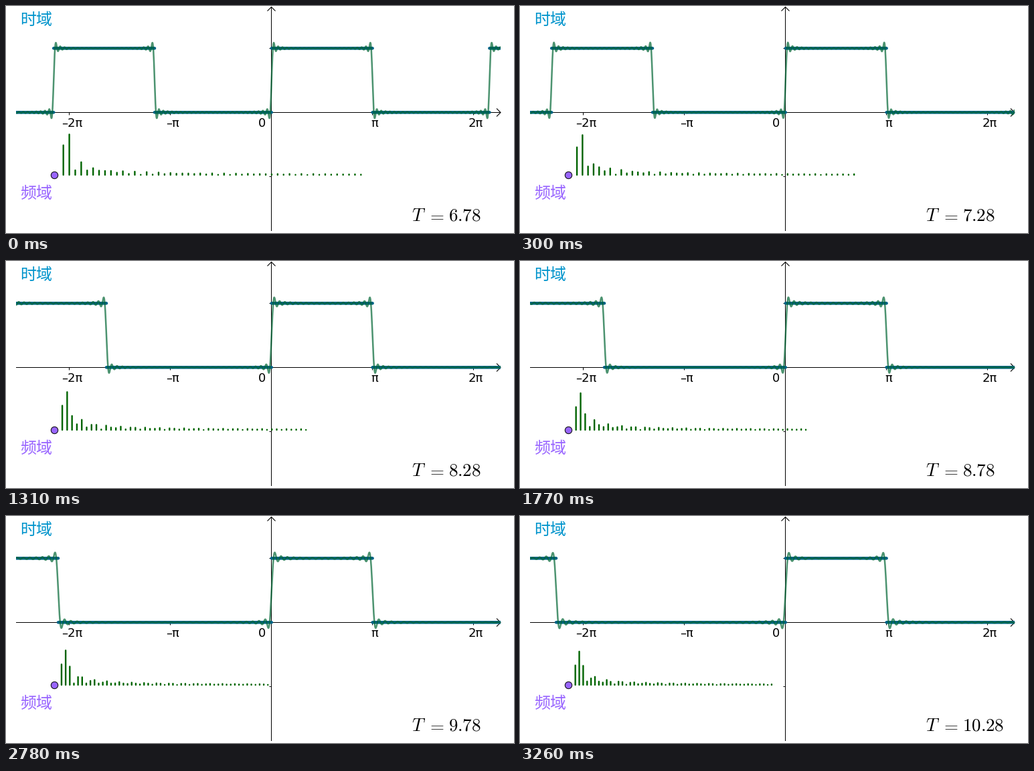
Write a matplotlib script that moves like this. It is 759x340 px and loops after 3720 ms.

```python
import numpy as np
import matplotlib.pyplot as plt
from matplotlib.animation import FuncAnimation

W, H, DPI = 759, 340, 64
PX = 72 / DPI                  # points per pixel
AX_X, AX_Y = 396.5, 159.5      # where the axes cross
OX, OY, UNIT = 396.8, 159.3, 48
LEFT, RIGHT = 15, 739
HARMONICS = 50
LEVEL = 2                      # height of the pulse
BAR_X, BAR_Y = 76.8, 253

STEP = 10
LOOP = 3720
CHANGES = [300, 780, 1310, 1770, 2320, 2780, 3260]

plt.rcParams["mathtext.fontset"] = "cm"
plt.rcParams["toolbar"] = "None"
plt.rcParams["path.snap"] = False
fig = plt.figure(figsize=(W / DPI, H / DPI), dpi=DPI, facecolor="white")
ax = fig.add_axes([0, 0, 1, 1])
ax.set_xlim(0, W)
ax.set_ylim(H, 0)
ax.axis("off")


def line(xs, ys, color, width, cap="butt", **kw):
    return ax.plot(xs, ys, color=color, lw=width * PX, solid_capstyle=cap, **kw)[0]


def label(x, y, text, size, color="black", font="DejaVu Sans", ha="left"):
    return ax.text(x, y, text, fontsize=size * PX, color=color,
                   family=font, ha=ha, va="baseline")


def draw_axes():
    line([LEFT, RIGHT], [AX_Y, AX_Y], "black", 1)
    line([AX_X, AX_X], [1, 337], "black", 1)
    line([733, 739, 733], [153.5, AX_Y, 165.5], "black", 1.1)
    line([390.5, AX_X, 402.5], [7.5, 1.5, 7.5], "black", 1.1)
    for k in (-2, -1, 1, 2):
        x = np.floor(AX_X + k * np.pi * UNIT) + 0.5
        line([x, x], [AX_Y, AX_Y + 4], "black", 1)
    for y in (AX_Y - 2 * UNIT, AX_Y + 2 * UNIT):
        line([AX_X - 3, AX_X], [y, y], "black", 1)
    for x, text in ((98.5, "–2π"), (248.5, "–π"), (382.5, "0"),
                    (550.5, "π"), (702, "2π")):
        label(x, 181, text, 18, ha="center")


def pulse_path(period):
    """High and low segments in pixels, separated by gaps."""
    xs, ys = [], []
    for k in range(-3, 4):
        for a, b, level in ((0, np.pi, LEVEL), (np.pi, period, 0)):
            x0 = max(OX + UNIT * (k * period + a), LEFT)
            x1 = min(OX + UNIT * (k * period + b), RIGHT)
            if x0 < x1:
                xs += [x0, x1, np.nan]
                ys += [OY - UNIT * level] * 2 + [np.nan]
    return xs, ys


def spectrum(period):
    n = np.arange(1, HARMONICS + 1)
    duty = np.pi / period
    return LEVEL * duty, 2 * LEVEL / (n * np.pi) * np.sin(n * np.pi * duty)


grid = np.linspace(LEFT, RIGHT, 2900)


def series(period):
    n = np.arange(1, HARMONICS + 1)
    mean, amps = spectrum(period)
    t = (grid - OX) / UNIT - np.pi / 2
    wave = mean + np.cos(np.outer(t, n) * 2 * np.pi / period) @ amps
    return OY - UNIT * wave


def bar_path(period):
    mean, amps = spectrum(period)
    heights = UNIT * np.abs(np.append(mean, amps))
    gap = UNIT / 5 * 2 * np.pi / period
    x = BAR_X + gap * np.arange(1, len(heights) + 1)
    none = np.full_like(x, np.nan)
    base = np.full_like(x, BAR_Y)
    xs = np.column_stack([x, x, none])
    ys = np.column_stack([base, base - heights, none])
    return xs.ravel(), ys.ravel()


draw_axes()
pulse = line([], [], (0, 0.39, 0.52), 4.6, "round")
curve = line(grid, grid * 0, (0, 0.4, 0.2), 2.5, alpha=0.7)
for part in (pulse, curve):
    part.set_clip_path(plt.Rectangle((LEFT, 0), RIGHT - LEFT, H,
                                     transform=ax.transData))
bars = line([], [], (0, 0.39, 0), 2.4, "round")
ax.plot([72], [BAR_Y], "o", ms=10.4 * PX, mfc=(0.6, 0.4, 1), mec="black", mew=PX)

label(21.5, 28.5, "时域", 24, (0, 0.58, 0.8), "Noto Sans CJK JP")
label(21.5, 287.5, "频域", 24, (0.6, 0.4, 1), "Noto Sans CJK JP")
label(605.5, 322, "$T$", 27)
label(629, 322, "$=$", 27)
value = label(661, 322, "", 27)

states = []
for i in range(len(CHANGES) + 1):
    T = 2 * np.pi + 0.5 * (i + 1)
    states.append((pulse_path(T), series(T), bar_path(T), f"${T:.2f}$"))


def update(frame):
    ms = frame * STEP
    pulse_xy, wave, bar_xy, text = states[sum(ms >= c for c in CHANGES)]
    pulse.set_data(*pulse_xy)
    curve.set_ydata(wave)
    bars.set_data(*bar_xy)
    value.set_text(text)
    return pulse, curve, bars, value


anim = FuncAnimation(fig, update, frames=LOOP // STEP, interval=STEP,
                     repeat=True, repeat_delay=0)
plt.show()
```
